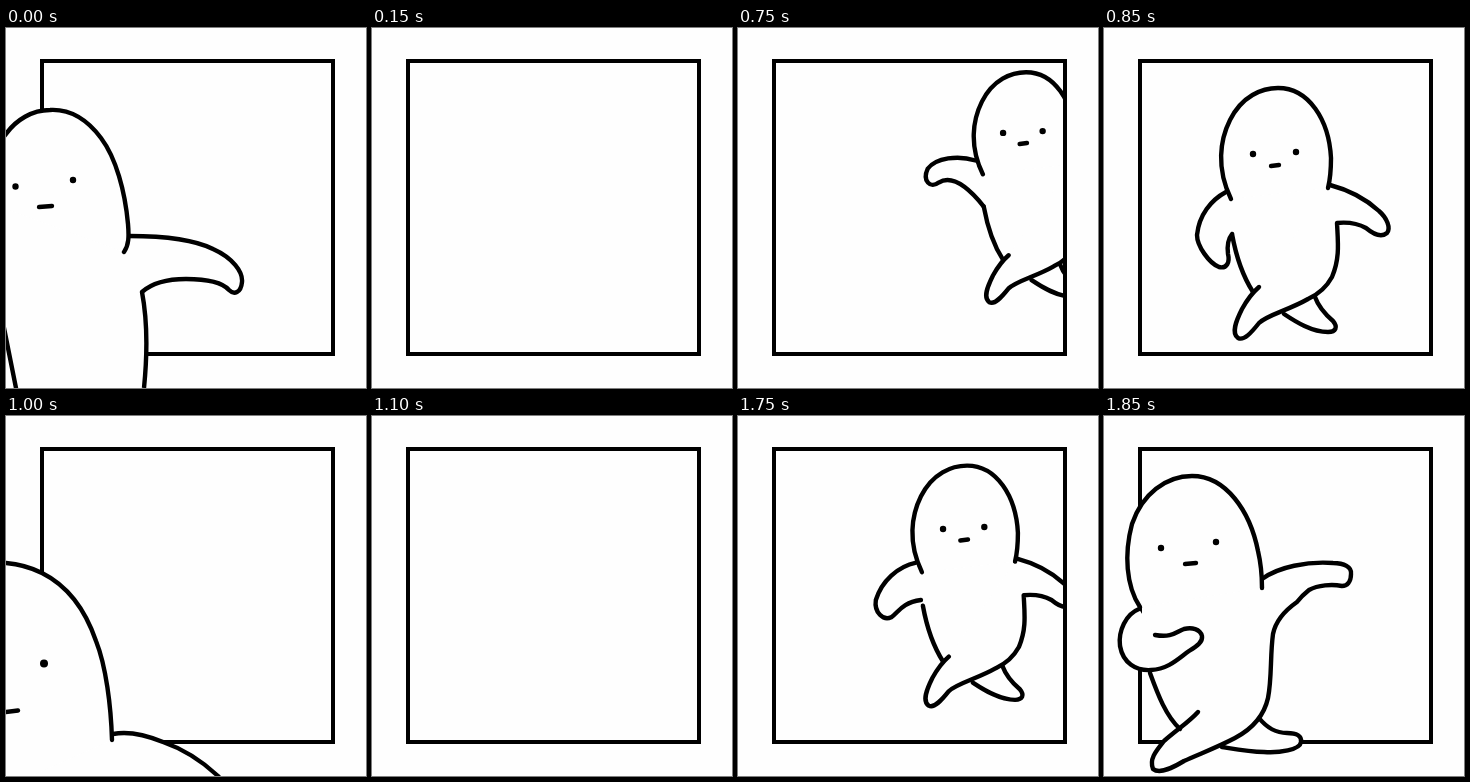
Animation of 360x360 px, one loop 1.9 s. Source, as an HTML page without scripts:

```html
<!DOCTYPE html>
<html lang="en">
<head>
<meta charset="utf-8">
<title>Walking out of the frame</title>
<style>
  html, body { margin: 0; height: 100%; overflow: hidden; background: #fefefe; }
  svg { display: block; width: 100vw; height: 100vh; }
  path, rect {
    fill: #fefefe; stroke: #000; stroke-width: 4.4;
    stroke-linecap: round; stroke-linejoin: round;
    vector-effect: non-scaling-stroke;
  }
  .frame { fill: none; stroke-width: 4; stroke-linejoin: miter; }
  .eyes { stroke-width: 6.4; }
  .line { fill: none; }

  /* One walk takes 950 ms; each pose holds for 50 ms of it. */
  .pose {
    visibility: hidden;
    animation: show 950ms step-end infinite;
    animation-delay: calc(var(--step) * 50ms - 1250ms);
  }
  @keyframes show {
    0% { visibility: visible; }
    5.26%, 100% { visibility: hidden; }
  }
</style>
</head>
<body>
<svg viewBox="0 0 360 360">
  <defs>
    <clipPath id="inside"><rect x="34" y="31" width="293" height="297"/></clipPath>
    <g id="trunk">
      <path d="M211 269C215 280 222 287 229 293C234 299 232 304 224 304C208 304 192 294 180 286"/>
      <path d="M226 157C245 162 263 172 275 183C283 190 287 200 283 205C277 210 268 205 262 200C253 195 243 194 233 195C234 215 236 230 228 249C222 260 215 266 204 271C185 282 163 287 155 295C147 305 140 313 134 310C127 305 132 293 138 281C143 272 148 265 155 259"/>
      <path class="line" d="M128 206C132 228 140 250 149 264"/>
      <path d="M127 171C112 140 116 112 126 92C138 68 158 60 174 60C205 60 225 92 227 130C227 142 226 152 224 160"/>
      <path class="eyes" d="M149 126h.01M192 124h.01"/>
      <path class="line" d="M167 138L175 137"/>
    </g>
    <g id="reaching">
      <use href="#trunk"/>
      <path d="M119 156C100 150 76 153 67 165C61 178 70 187 79 180C92 172 108 181 128 206"/>
    </g>
  </defs>

  <g clip-path="url(#inside)">
    <path class="pose" style="--step:0" d="M332 114C318 115 306 123 304 132C304 139 308 142 312 142C317 141 320 135 332 136"/>
    <g class="pose" style="--step:1"><use href="#reaching" transform="translate(193 -7) scale(.88)"/></g>
    <g class="pose" style="--step:2"><use href="#reaching" transform="translate(128 -11) scale(.92)"/></g>
    <g class="pose" style="--step:3">
      <g transform="translate(62 -8) scale(.96)">
        <use href="#trunk"/>
        <path d="M121 161C102 165 85 180 79 200C77 213 87 222 95 218C103 213 105 203 126 200"/>
      </g>
    </g>
    <g class="pose" style="--step:4">
      <use href="#trunk"/>
      <path d="M122 164C107 172 95 187 93 207C93 218 105 235 115 239C123 241 126 234 124 226C123 218 124 211 128 206"/>
    </g>
  </g>

  <rect class="frame" x="36" y="33" width="291" height="293"/>

  <g class="pose" style="--step:5">
    <path d="M155 302C163 312 172 317 183 317C193 317 198 320 197 326C196 334 175 337 160 336C145 336 130 333 118 331"/>
    <path d="M158 163C174 151 204 145 229 147C240 147 248 151 247 158C247 166 243 170 238 170C228 168 214 169 205 174C200 178 196 182 193 186C183 193 172 203 169 218C166 240 168 262 164 282C160 300 148 313 131 322C112 332 95 338 80 345C70 351 56 359 49 353C45 343 52 335 60 325C75 312 85 306 94 296"/>
    <path class="line" d="M46 257C54 279 62 300 76 313"/>
    <path d="M36 191C22 170 20 138 28 108C38 78 62 60 88 60C122 60 146 95 154 135C158 152 158 162 158 172"/>
    <path d="M35 193C22 198 14 215 16 230C19 247 32 255 47 254C65 253 75 242 85 235C93 230 99 226 98 220C96 213 88 211 80 213C72 216 68 222 51 219"/>
    <path class="eyes" d="M57 132h.01M112 126h.01"/>
    <path class="line" d="M81 148L92 147"/>
  </g>

  <g class="pose" style="--step:6">
    <path d="M123 208C150 208 185 210 207 221C227 230 237 244 236 254C235 265 228 267 223 262C216 254 200 251 180 251C160 251 145 256 136 264C140 285 142 320 138 360L136 375H13L-4 290L-30 170"/>
    <path d="M118 224C123 217 123 208 122 196C119 163 110 130 95 110C80 90 62 81 44 82C26 82 10 92 0 106Q-22 132 -30 170"/>
    <path class="eyes" d="M9.500 158.500h.01M67 152h.01"/>
    <path class="line" d="M33 179L46 178"/>
  </g>

  <g class="pose" style="--step:7">
    <path d="M107 318C122 315 140 319 157 326C180 334 197 346 212 360L230 380H-20"/>
    <path d="M106 324C105 290 100 250 90 225C78 190 58 168 36 157C24 151 12 148 0 147L-20 145V380"/>
    <path class="eyes" style="stroke-width:8" d="M38 247.500h.01"/>
    <path class="line" d="M-8 297L12 294.500"/>
  </g>

  <path class="pose" style="--step:8" d="M-20 248C32 254 64 300 72 380H-20"/>
</svg>
</body>
</html>
```
